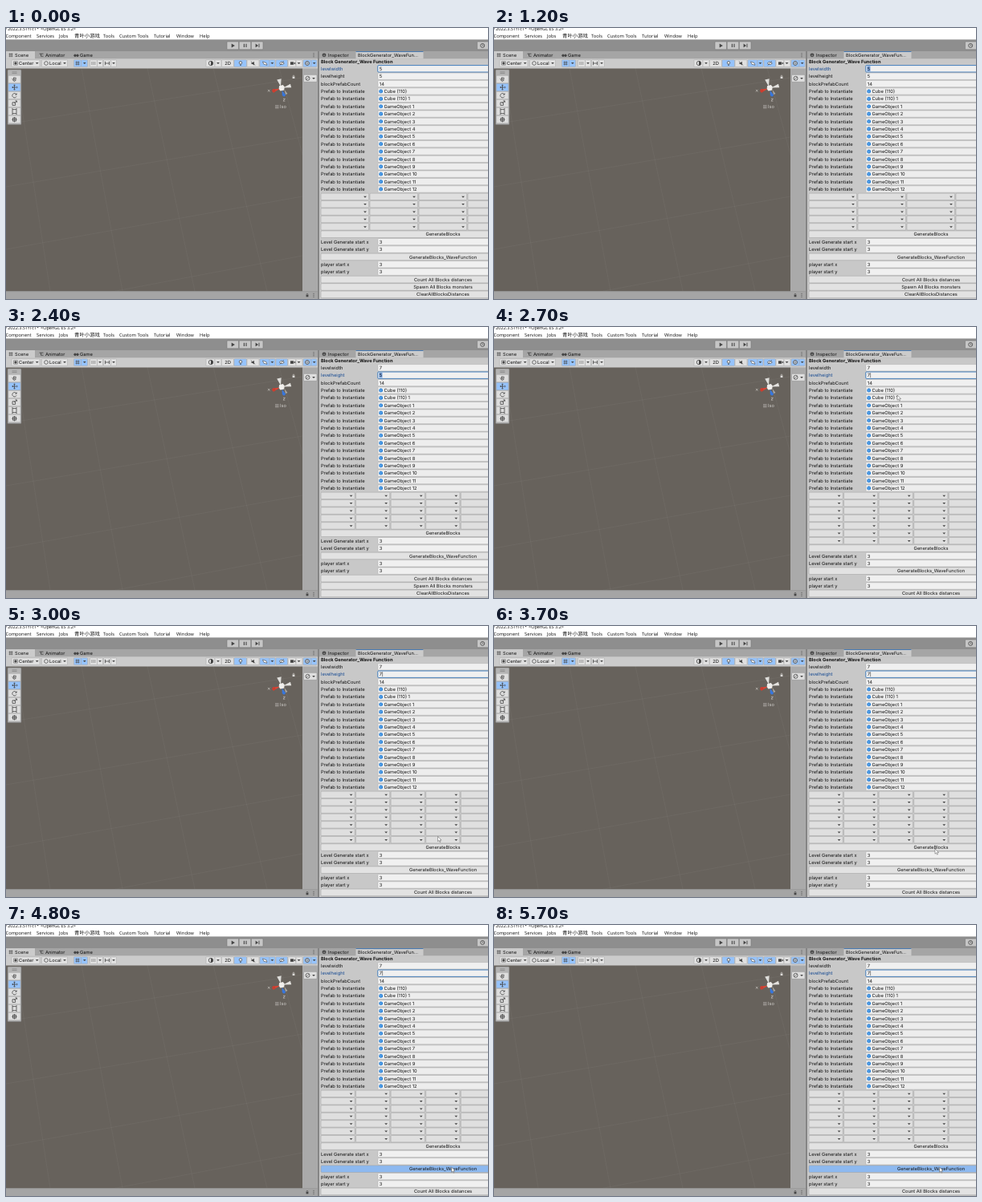
Recreate the animation shown at these times as an HTML page. Size 600 by 338 pixels, loop 8 s.

```html
<!DOCTYPE html>
<html lang="en">
<head>
<meta charset="utf-8">
<title>Editor panel</title>
<style>
  html, body { margin: 0; width: 100%; height: 100%; overflow: hidden; background: #c8c8c8; }
  svg { display: block; width: 100vw; height: 100vh; }
  text { font: 5.75px Inter, sans-serif; fill: #101010; white-space: pre; text-rendering: geometricPrecision; }
  .bold { font-weight: 700; }
  .mid { text-anchor: middle; }
  .menu { font: 5.8px "Open Sans", sans-serif; }
  .cjk { font: 6.4px "Noto Sans CJK SC", "Noto Sans CJK", sans-serif; }
  .title { font: 5.5px "Open Sans", sans-serif; }
  .focus { fill: #174a92; }
  .iso { fill: #d0cecb; }
</style>
</head>
<body>
<svg viewBox="0 0 600 338" preserveAspectRatio="none">
  <g id="frame"></g>
  <g id="inspector"></g>
  <path id="pointer" d="M0 0V6.2L1.5 4.9 2.5 7.1 3.5 6.7 2.6 4.5H4.6Z" fill="#fff" stroke="#444" stroke-width=".45"/>
</svg>
<script>
const LOOP = 8000, ROW = 9.385, FIRST = 50.8;
const BLUE = '#96c3fb', INK = '#444';
const $ = id => document.getElementById(id);

const rect = (x, y, w, h, fill, stroke = 'none', r = 0, sw = .6) =>
  `<rect x="${x}" y="${y}" width="${w}" height="${h}" rx="${r}" fill="${fill}" stroke="${stroke}" stroke-width="${sw}"/>`;
const path = (d, fill = 'none', stroke = INK, sw = .8) =>
  `<path d="${d}" fill="${fill}" stroke="${stroke}" stroke-width="${sw}"/>`;
const circle = (x, y, r, fill = 'none', stroke = INK, sw = .8) =>
  `<circle cx="${x}" cy="${y}" r="${r}" fill="${fill}" stroke="${stroke}" stroke-width="${sw}"/>`;
// y is the vertical middle of the capitals
const text = (x, y, s, cls = '') => `<text x="${x}" y="${y + 2.1}" class="${cls}">${s}</text>`;
const arrow = (x, y) => path(`M${x - 1.9} ${y - .9}h3.8l-1.9 2z`, INK, 'none');
const dots = (x, y) => [-2, 0, 2].map(d => circle(x, y + d, .55, INK, 'none')).join('');
const lock = (x, y, c = INK) => rect(x - 1.4, y - .4, 2.8, 2.4, c) + path(`M${x - .9} ${y - .4}v-1q.9-1.6 1.8 0v1`, 'none', c, .6);
const gridIcon = (x, y) => path(`M${x - 1.2} ${y - 2.5}v5m2.4-5v5m-3.7-3.7h5m-5 2.4h5`, 'none', INK, .65);

function menus() {
  const items = [[-.5, 'Component'], [38, 'Services'], [66, 'Jobs'], [121, 'Tools'], [141, 'Custom Tools'],
    [184, 'Tutorial'], [212, 'Window'], [241, 'Help']];
  return rect(0, 0, 600, 14.5, '#fff')
    + text(-2, .7, 'y 2022.3.51f1c1*', 'title') + text(43, .7, '&lt;OpenGL ES 3.2&gt;', 'title')
    + items.map(([x, s]) => text(x, 9.9, s, 'menu')).join('')
    + text(85, 10, '青叶小游戏', 'cjk');
}

function playBar() {
  return rect(0, 14.5, 600, 14.5, '#8e8e8e')
    + [275, 290.2, 305.4].map(x => rect(x, 17, 14.6, 9.8, '#c6c6c6', '#787878', .8)).join('')
    + path('M280.7 19.4v5l4.2-2.5z', INK, 'none')
    + path('M296.4 19.8v4.2m2.6-4.2v4.2', 'none', INK, 1.1)
    + path('M310.6 19.6v4.6l3.4-2.3z', INK, 'none') + path('M315 19.6v4.6', 'none', INK, .9)
    + rect(586.5, 17, 16, 9.8, '#c6c6c6', '#787878', .8)
    + circle(593.2, 21.9, 2.5) + path('M593.2 20.3v1.8h1.4', 'none', INK, .6);
}

function sceneTabs() {
  return rect(0, 29, 388, 9.5, '#a5a5a5') + rect(0, 29, 36, 9.5, '#cbcbcb')
    + gridIcon(6, 33.8) + text(11, 33.8, 'Scene')
    + path('M41.5 32.2h2v3h3m-3-3h3', 'none', INK, .9) + text(49, 33.8, 'Animator')
    + circle(86, 34.3, 1.3, INK) + circle(89, 34.3, 1.3, INK) + text(92, 33.8, 'Game')
    + dots(383, 33.8);
}

function sceneToolbar() {
  const box = (x, w, fill = '#e0e0e0') => rect(x, 39.7, w, 8.8, fill, '#a8a8a8', .7, .5);
  const y = 44;
  return rect(0, 38.5, 388, 12, '#cbcbcb')
    + box(7, 35) + circle(12, y, 1.2, INK) + path('M9.6 41.8v4.4h4.8v-4.4z', 'none', INK, .5)
    + text(16, y, 'Center') + arrow(38.7, y)
    + box(44.5, 32) + path('M50 41.5l2.2 1.2v2.6L50 46.5l-2.2-1.2v-2.6z', 'none', INK, .7)
    + text(54, y, 'Local') + arrow(73, y)
    + box(84.5, 9, BLUE) + gridIcon(89, y) + box(93.5, 8, BLUE) + arrow(97.8, y)
    + box(104.5, 9) + path('M106.8 42v4m2-4v4m2-4v4', 'none', '#888', .8) + box(113.5, 7) + arrow(117, y)
    + box(121.5, 9) + path('M123.5 41.8v4.4m5-4.4v4.4m-5-2.2h5') + box(130.5, 7) + arrow(134, y)
    + box(249, 11) + circle(255, y, 2.7) + path('M255 41.3a2.7 2.7 0 0 1 0 5.4z', INK, 'none') + box(260, 8) + arrow(264, y)
    + box(268.5, 15) + text(276, y, '2D', 'mid')
    + box(284, 15.5, BLUE) + circle(292, 43.4, 1.7, '#fff') + path('M291 46.3h2')
    + box(300, 15) + path('M305.5 43.3h1.4l2-1.5v4.6l-2-1.5h-1.4z', INK, 'none') + path('M304.8 41.5l5.5 5', 'none', INK, .6)
    + box(316, 12, BLUE) + path('M319.5 42l4.5 1.5 1 2.8-4.2-1.2z', '#fff', INK, .6) + box(328, 7, BLUE) + arrow(331.4, y)
    + box(336, 14.5, BLUE) + path('M340.3 44q3-3.4 6 0q-3 3.2-6 0z', '#fff', INK, .7) + path('M340.7 46.5l5.2-5', 'none', INK, .7)
    + box(351, 10) + rect(354, 42.3, 4, 3.5, INK) + path('M358 44l2.2-1.6v3.2z', INK, 'none') + box(361, 8) + arrow(364.6, y)
    + box(370, 10, BLUE) + circle(375, y, 2.5, '#dcecff') + path('M372.5 44h5m-2.5-2.5v5', 'none', INK, .5) + box(380, 7, BLUE) + arrow(383.7, y);
}

function toolStrip() {
  const icons = [
    'M8.5 64.5l-.7-1.4m1.7.9v-2.4m1.4 2.3v-2.7m1.3 2.8v-2.2m-3.5 3q1.6 3.4 3.6 0z',
    'M10.5 70.8v6.4m-3.2-3.2h6.4m-4.1-2.2.9-1 .9 1m-1.8 4.4.9 1 .9-1m-2.4-3.1-1 .9 1 .9m4.4-1.8 1 .9-1 .9',
    'M12.8 82.7a2.7 2.7 0 1 0 .2 2.7m.2-4v1.8h-1.8',
    'M8 92.8h3.6v3.6h-3.6zm2.3 1.2 3-3m-1.8-.1h2v2',
    'M8 101.6h5v5h-5zm-.8-.8h1.4m3.8 0h1.4m-6.6 6.6h1.4m3.8 0h1.4',
    'M10.5 111v6.4m-3.2-3.2h6.4m-5.2-2h4v4h-4z'
  ];
  return rect(2, 52, 17, 68.5, '#b4b4b4', '#7c7c7c', 1)
    + path('M7.5 54.8h6m-6 1.7h6', 'none', '#777', .6)
    + icons.map((d, i) => rect(3, 59.3 + i * 10, 15, 9.5, i === 1 ? BLUE : '#dedede', '#999', .6, .4) + path(d, 'none', INK, .8)).join('');
}

function scene() {
  let grid = '';
  for (let i = 0; i < 6; i++) grid += `M${-70 + i * 82} 50L${-35 + i * 90} 328`;
  for (let i = 0; i < 4; i++) grid += `M0 ${120 + i * 78}L369 ${62 + i * 74}`;
  return rect(0, 50.5, 369, 278, '#67625c')
    + `<g opacity=".06">${path(grid, 'none', '#fff', .7)}</g>`
    + toolStrip()
    + path('M342 73L337.2 64.6l5.5-1.4z', '#deddda', 'none')
    + path('M345 74.5l9-4.8 1.2 4.6z', '#e4e2df', 'none')
    + path('M341.5 75.5l-9.6 1 .8 4.3z', '#d84635', 'none') + circle(333.3, 78.3, 2.1, '#c93e30', 'none')
    + path('M343.6 77.5l.2 6.5 4-.8z', '#3b79dc', 'none') + circle(346, 83.6, 1.9, '#3776dc', 'none')
    + path('M346.5 77l4 5-2.5 1z', '#aaa7a3', 'none')
    + path('M340 72.3l4.7-1.2 2 2.2-.5 4.2-4.7.9-1.8-2.4z', '#f0eeeb', 'none')
    + path('M326 76.9l2.5 2.7m0-2.7l-2.5 2.7', 'none', '#d8d5d2', .6)
    + path('M345 88.3h2.4l-2.4 2.8h2.4', 'none', '#d8d5d2', .6)
    + lock(358, 61, '#dedcd9')
    + path('M335 96.7h4.6m-4.6 1.6h4.6m-4.6 1.6h4.6', 'none', '#c9c6c3', .6) + text(341, 98.3, 'Iso', 'iso')
    + rect(369, 50.5, 19, 278, '#aaa')
    + rect(370.5, 58.3, 16.5, 9, '#dedede', '#8a8a8a', .8, .5)
    + circle(375.5, 62.8, 2.5) + path('M373.7 64.5l3.6-3.4', 'none', INK, .6) + arrow(383, 62.8)
    + rect(0, 328.5, 388, 9.5, '#a5a5a5') + path('M0 328.6h388', 'none', '#888', .5)
    + lock(375, 333.3) + dots(383, 333.3);
}

function inspectorTabs() {
  return rect(388, 29, 2, 309, '#858585') + rect(390, 29, 210, 9.5, '#a5a5a5')
    + rect(435.5, 29, 84, 9.5, '#cbcbcb') + rect(435.5, 29, 84, .9, '#3a72b0')
    + circle(396, 33.8, 2.4, INK, 'none') + path('M396 33.3v1.9', 'none', '#ddd', .7) + text(401, 33.8, 'Inspector')
    + text(438, 33.8, 'BlockGenerator_WaveFun...')
    + rect(390, 38.5, 210, 300, '#c8c8c8') + text(392, 42.2, 'Block Generator_Wave Function', 'bold');
}

function inspector({ width, height, focus, select, hover, pressed, over }) {
  let row = 0, out = '';
  const next = () => FIRST + ROW * row++;
  const field = (label, value, { state = '', prefab = false } = {}) => {
    const y = next(), active = state === 'focus';
    const stroke = active ? '#3273b8' : state === 'hover' ? '#6c6c6c' : '#a6a6a6';
    out += text(392, y, label, active ? 'focus' : '')
      + rect(462.8, y - 4.2, 240, 8.4, prefab ? '#ededed' : '#f0f0f0', stroke, .9, active ? .9 : .5);
    if (prefab) out += path(`M466.7 ${y - 2.6}l2.3 1.3v2.6l-2.3 1.3-2.3-1.3v-2.6z`, '#2c83d8', 'none')
      + path(`M464.9 ${y - 1.1}l1.8.9 1.8-.9m-1.8.9v2`, 'none', '#9bd0ff', .5);
    if (active && select) out += rect(464.4, y - 3.3, 4.1, 6.6, '#7ba6e2');
    out += text(prefab ? 470.4 : 464.8, y, value);
    if (active && !select && value === 7) out += path(`M468.6 ${y - 3}v6`, 'none', '#222', .5);
  };
  const button = (label, fill = '#e2e2e2') => {
    const y = next();
    out += rect(392, y - 4.3, 304, 8.6, fill, '#9c9c9c', 1.2, .5) + text(544, y, label, 'mid');
  };
  const fieldState = name => name === focus ? 'focus' : name === hover ? 'hover' : '';

  field('levelwidth', width, { state: fieldState('width') });
  field('levelheight', height, { state: fieldState('height') });
  field('blockPrefabCount', 14);
  for (let i = -1; i <= 12; i++) {
    const name = i < 0 ? 'Cube (110)' : i ? 'GameObject ' + i : 'Cube (110) 1';
    field('Prefab to Instantiate', name, { prefab: true });
  }
  const pitch = 305 / width;
  for (let r = 0; r < height; r++) {
    const y = next();
    for (let x = 392; x < 600; x += pitch)
      out += rect(x, y - 4.2, pitch - 1.4, 8.4, '#dfdfdf', '#a2a2a2', 1, .5) + arrow(x + pitch - 6, y + .2);
  }
  button('GenerateBlocks');
  field('Level Generate start x', 3);
  field('Level Generate start y', 3);
  button('GenerateBlocks_WaveFunction', pressed ? '#8db9f0' : over ? '#ececec' : undefined);
  field('player start x', 3);
  field('player start y', 3);
  ['Count All Blocks distances', 'Spawn All Blocks monsters', 'ClearAllBlocksDistances'].forEach(s => button(s));
  return out;
}

// Each step changes part of the panel state from its time on.
const steps = [
  [0, { width: 5, height: 5, focus: 'width', select: false }],
  [600, { select: true }],
  [1400, { width: 7, select: false }],
  [1900, { hover: 'height' }],
  [2200, { focus: 'height', select: true }],
  [2700, { height: 7, select: false, hover: '' }],
  [4400, { over: true }],
  [4800, { pressed: true }]
];
// time, x, y
const pointerPath = [
  [2700, 502, 85], [3000, 537.5, 262.5], [3100, 537.5, 262.5], [3200, 539.3, 267.3],
  [3300, 539.3, 267.3], [3700, 549, 278], [4100, 549, 278], [4400, 554.5, 302], [LOOP, 554.5, 302]
];

function pointerAt(t) {
  const i = pointerPath.findIndex(p => p[0] > t);
  const [t0, x0, y0] = pointerPath[i - 1], [t1, x1, y1] = pointerPath[i];
  const k = (t - t0) / (t1 - t0);
  return [x0 + (x1 - x0) * k, y0 + (y1 - y0) * k];
}

let shown = -1;
function draw(now) {
  const t = Math.floor((now % LOOP) / 100) * 100;
  const active = steps.filter(s => s[0] <= t);
  if (active.length !== shown) {
    shown = active.length;
    $('inspector').innerHTML = inspector(Object.assign({}, ...active.map(s => s[1])));
  }
  const visible = t >= pointerPath[0][0];
  $('pointer').setAttribute('visibility', visible ? 'visible' : 'hidden');
  if (visible) $('pointer').setAttribute('transform', `translate(${pointerAt(t)})`);
}

$('frame').innerHTML = menus() + playBar() + sceneTabs() + sceneToolbar() + scene() + inspectorTabs();
const start = performance.now();
function tick() {
  draw(performance.now() - start);
  requestAnimationFrame(tick);
}
tick();
</script>
</body>
</html>
```
